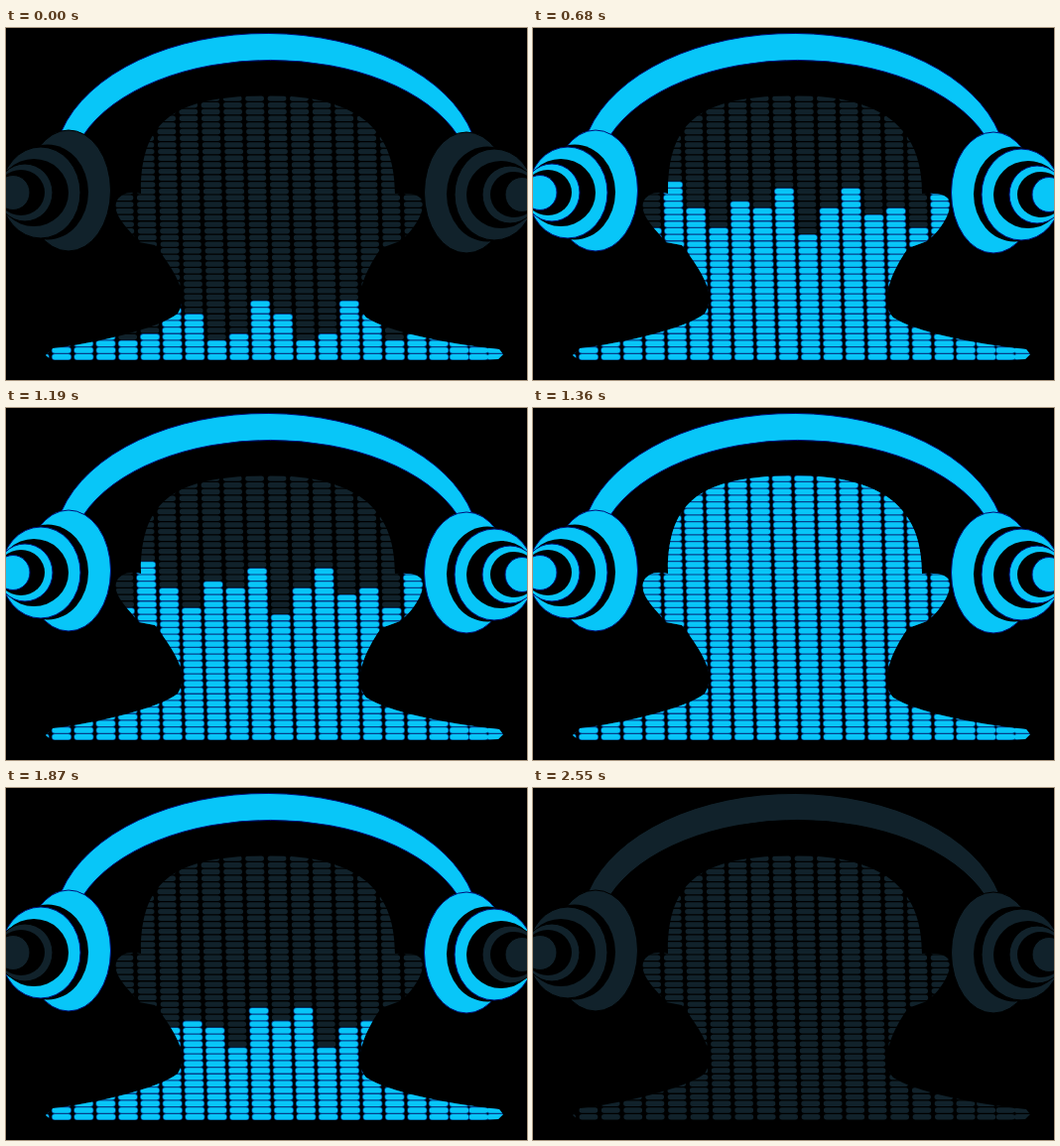
Animation of 525x355 px, one loop 2890 ms. Source, as an HTML page:

```html
<!DOCTYPE html>
<html lang="en">
<head>
<meta charset="utf-8">
<title>Headphone equalizer</title>
<style>
html, body { margin: 0; width: 100%; height: 100%; overflow: hidden; background: #000; }
svg { display: block; width: 525px; height: 355px; }
.segments { fill: none; stroke-width: 5.4; stroke-linecap: round; }
#rim { stroke-width: 7; }
</style>
</head>
<body>
<svg viewBox="0 0 525 355">
  <defs>
    <clipPath id="head">
      <path d="M40 330L47 323C90 318 155 303 173 288C184 270 174 250 150 219L134 216
        C121 200 108 189 111 176Q116 163 136 167C135 88 175 69 265 68C350 69 392 98 392 167
        Q418 165 420 176C421 188 410 205 397 215L378 222C358 250 350 278 363 292
        C385 306 440 318 497 324L501 329L496 334L480 335H46Z"/>
    </clipPath>
  </defs>
  <path id="band" d="M56 104A214 134 0 0 1 470 107L455 108A202 118 0 0 0 78 108Z"/>
  <g class="cup"></g>
  <g class="cup" transform="translate(527 2) scale(-1 1)"></g>
  <g clip-path="url(#head)" class="segments">
    <path id="unlit" stroke="#11222b"/>
    <path id="rim" stroke="#05408c"/>
    <path id="lit" stroke="#08c6f8"/>
  </g>
</svg>
<script>
const LIT = '#08c6f8', DARK = '#11222b', EDGE = '#00127c';
const STEP = 170, LOOP = 2890, ROWS = 40, PITCH = 6.68, FLOOR = 335;
const { cos, exp, abs, max, min, floor, round, PI } = Math;
const $ = id => document.getElementById(id);

// Each shell: cx, cy, rx, ry, part (0 gap, 1 outer ring, 2 inner driver).
const SHELLS = [
  [63, 164, 42.5, 61, 1], [42, 165.5, 41, 48, 0], [35, 166, 40, 46, 1],
  [28, 166, 35, 34, 0], [19, 166, 28, 29, 2], [15, 166, 24, 23, 0], [7, 166, 17, 17.5, 2]
];
const shells = [];
for (const cup of document.querySelectorAll('.cup')) {
  for (const [cx, cy, rx, ry, part] of SHELLS) {
    const node = document.createElementNS('http://www.w3.org/2000/svg', 'ellipse');
    Object.entries({ cx, cy, rx, ry }).forEach(([k, v]) => node.setAttribute(k, v));
    cup.append(node);
    shells.push({ node, part });
  }
}

function paint(node, on) {
  node.setAttribute('fill', on ? LIT : DARK);
  node.setAttribute('stroke', on ? EDGE : '#000');
}

// Columns lean slightly to the left and crowd together at the right end.
function bars(height) {
  let d = '';
  for (let k = -1; k <= 20; k++) {
    const base = 56 + 22.4 * k - 0.6 * max(0, k - 16) ** 2;
    const top = min(ROWS, round(height(k)));
    for (let n = 1; n <= top; n++) {
      const y = FLOOR - PITCH * (n - 0.5);
      const x = base - 0.027 * (330 - y);
      d += `M${(x - 6.7).toFixed(1)} ${y.toFixed(1)}h13.4`;
    }
  }
  return d;
}

// Height of column k, in segments, as the sound gets louder.
const ripple = k => cos(2 * PI * k / 3 + PI / 6) * cos(PI * (k - 10.5) / 6);
const low = k => 5.7 + 3.4 * cos(PI * (k - 9.3) / 2);
const mid = k => 14 + 5 * cos(2 * PI * abs(k - 10) / 3 - 1.4) * exp(-(((k - 10) / 3) ** 2));
const high = k => 23 + 4.7 * ripple(k);
const loud = k => 31 + 4.7 * ripple(k + 2);
const full = () => ROWS;
const none = () => 0;

// cups counts the glowing cup parts.
const pose = (height, cups, band = true) => ({ d: bars(height), cups, band });
const POSES = {
  a: pose(low, 0), b: pose(mid, 1), c: pose(high, 2),
  d: pose(loud, 2), e: pose(full, 2), o: pose(none, 0, false)
};
const BEAT = 'abcdcedcedcbcbao';

$('unlit').setAttribute('d', bars(full));

let shown = '';
function draw(time) {
  const key = BEAT[min(BEAT.length - 1, floor((time % LOOP) / STEP))];
  if (key === shown) return;
  shown = key;
  const { d, cups, band } = POSES[key];
  $('rim').setAttribute('d', d);
  $('lit').setAttribute('d', d);
  paint($('band'), band);
  for (const { node, part } of shells) {
    if (part) paint(node, part <= cups);
  }
}

const start = performance.now();
function tick() {
  draw(performance.now() - start);
  requestAnimationFrame(tick);
}
tick();
</script>
</body>
</html>
```
